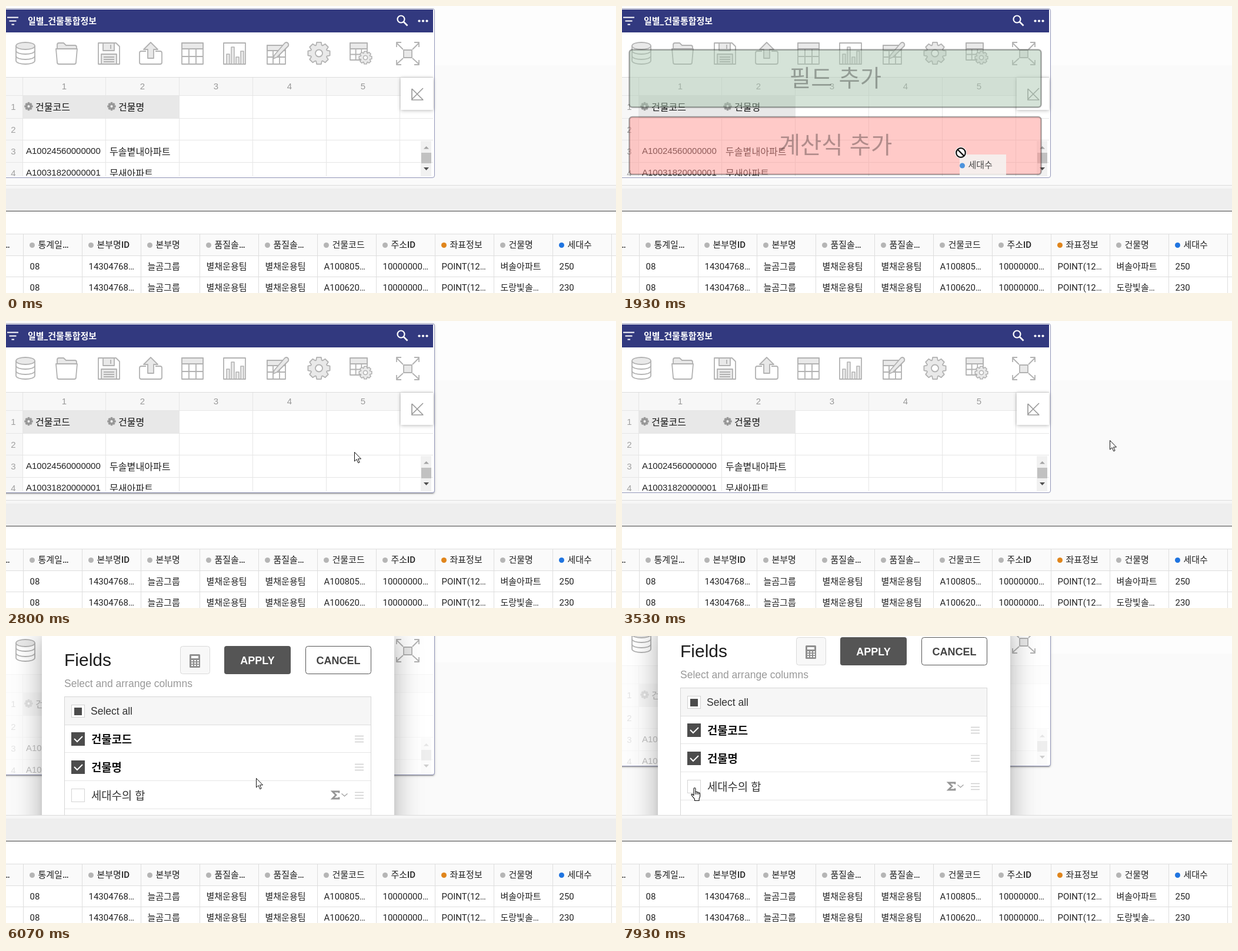
Write an HTML page that moves like this. It is 1037 px wide and 489 px high and loops after 8 s.

```html
<!DOCTYPE html>
<html lang="ko">
<head>
<meta charset="utf-8">
<style>
  html, body { margin: 0; width: 100%; height: 100%; overflow: hidden; background: #fff; }
  svg, div { position: absolute; left: 0; top: 0; }
  svg { overflow: visible; }
  text { white-space: pre; }
  #stage { width: 1037px; height: 489px; overflow: hidden; }
  #pane { width: 1037px; height: 305px; overflow: hidden; background: #fafafa; }
  #scroller { width: 1037px; height: 700px; }
  #sky { width: 1037px; height: 101px; background: #fdfdfd; }
  #win, #lift { left: -10px; top: 4px; width: 737px; height: 287px; border: 1px solid #9296b8; border-radius: 4px; background: #fff; }
  #lift { box-shadow: 0 3px 1px -2px rgba(0,0,0,.2), 0 2px 2px rgba(0,0,0,.14), 0 1px 5px rgba(0,0,0,.12); }
  #dialog { width: 1037px; height: 700px; }
  #sheet { left: 61px; top: 42px; width: 599px; height: 600px; background: #fff;
    box-shadow: 0 11px 15px -7px rgba(0,0,0,.2), 0 24px 38px 3px rgba(0,0,0,.14), 0 9px 46px 8px rgba(0,0,0,.12); }
  #card { filter: drop-shadow(0 1px 3px rgba(0,0,0,.28)); }
</style>
</head>
<body>
<div id="stage">
  <div id="pane"><div id="scroller">
    <div id="sky"></div><div id="lift"></div><div id="win"></div>
    <svg id="grid" width="1037" height="700"></svg>
    <div id="dialog"><div id="sheet"></div><svg id="fields" width="1037" height="700"></svg></div>
  </div></div>
  <svg id="table" width="1037" height="489"></svg>
  <svg id="overlay" width="1037" height="489"></svg>
</div>
<script>
const $ = id => document.getElementById(id);
const KR = "'Noto Sans CJK KR','Noto Sans CJK JP'";
const ARIAL = `'Liberation Sans',${KR},sans-serif`;
const ROBOTO = `Roboto,${KR},sans-serif`;

// Drawing helpers; text is placed by its vertical centre.
const rect = (x, y, w, h, fill, more = '') =>
  `<rect x="${x}" y="${y}" width="${w}" height="${h}" fill="${fill}" ${more}/>`;
const path = (d, stroke, width = 1, fill = 'none', more = '') =>
  `<path d="${d}" stroke="${stroke}" stroke-width="${width}" fill="${fill}" ${more}/>`;
const dot = (x, y, r, fill) => `<circle cx="${x}" cy="${y}" r="${r}" fill="${fill}"/>`;
const text = (x, cy, str, size, fill, { font = ARIAL, weight = 400, anchor = 'start' } = {}) =>
  `<text x="${x}" y="${cy + size * .36}" font-family="${font}" font-size="${size}" ` +
  `font-weight="${weight}" text-anchor="${anchor}" fill="${fill}">${str}</text>`;
const box = (x, y, w, h, fill, stroke, r = 0) =>
  rect(x + .5, y + .5, w - 1, h - 1, fill, `stroke="${stroke}" rx="${r}"`);

function gear(cx, cy, r, hole, stroke, fill, width) {
  const pts = [];
  for (let i = 0; i < 8; i++)
    for (const [turn, k] of [[-.34, .76], [-.2, 1], [.2, 1], [.34, .76]]) {
      const a = i * Math.PI / 4 + turn;
      pts.push(`${(cx + r * k * Math.cos(a)).toFixed(1)} ${(cy + r * k * Math.sin(a)).toFixed(1)}`);
    }
  return path(`M${pts.join('L')}Z`, stroke, width, fill, 'stroke-linejoin="round"') +
    `<circle cx="${cx}" cy="${cy}" r="${hole}" fill="#fff" stroke="${stroke}" stroke-width="${width}"/>`;
}

function toolbar() {
  const ink = '#b2b2b2', tint = '#e9e9e9';
  const line = (d, fill = 'none', w = 1.8) => path(d, ink, w, fill, 'stroke-linejoin="round"');
  const sheet = (x, s) => line(`M${x} 63h${s}v${s}h${-s}z`, '#fff') + line(`M${x} 63h${s}v10h${-s}z`, tint) +
    line(`M${x} ${73 + (s - 10) / 2}h${s}M${x + s / 3} 73v${s - 10}M${x + s * 2 / 3} 73v${s - 10}`);
  return [
    line('M17 68v25c0 8 32 8 32 0V68', '#fff') + line('M17 68c0-8 32-8 32 0s-32 8-32 0', tint) +
      line('M17 76c0 8 32 8 32 0M17 85c0 8 32 8 32 0'),
    line('M87 72v-6q0-3 3-3h8l4 4h15q3 0 3 3v3', tint) + line('M85 73h36l-2 23q0 3-3 3H90q-3 0-3-3z', '#fff'),
    line('M157 63h30l6 6v30h-36z', '#fff') + line('M165 63h19v13h-19z', tint) + line('M178 66v7') +
      line('M162 82h26v17h-26z', tint) + line('M166 87h18M166 91h18M166 95h18'),
    line('M238 77h-8q-3 0-3 3v16q0 3 3 3h32q3 0 3-3V80q0-3-3-3h-8', '#fff') +
      line('M241 89V74h-7l12-12 12 12h-7v15z', tint),
    sheet(299, 36),
    line('M370 63h37v36h-37z', '#fff') + line('M375 82h5v17h-5zM383 70h5v29h-5zM391 87h5v12h-5zM399 77h5v22h-5z', tint, 1.5),
    line('M444 67h31v32h-31z', '#fff') + line('M444 67h31v9h-31z', tint) +
      line('M444 87h31M454 76v23M465 76v23') + line('M456 84l18-21q3-2 5 0t1 5l-19 19-7 3z', tint),
    gear(532, 80.5, 19, 6, ink, tint, 1.8),
    sheet(585, 29) + gear(611, 88, 11, 3.5, ink, tint, 1.6),
    line('M676 75h14v13h-14z', tint) + line('M675 74l-11-11M691 74l11-11M675 89l-11 10M691 89l11 10' +
      'M664 70v-8h8M694 62h8v8M664 92v8h8M694 100h8v-8')
  ].join('');
}

function drawGrid() {
  const edges = [28, 169, 294, 419, 544, 669];
  const rows = [152, 191, 228, 266];
  const centre = { anchor: 'middle' };
  const headings = [[50, 38.5, '건물코드'], [191, 179.5, '건물명']];
  const cells = [[247, 'A10024560000000', '두솔볕내아파트'], [284, 'A10031820000001', '무새아파트']];
  $('grid').innerHTML =
    '<clipPath id="body"><rect y="45" width="726" height="245"/></clipPath>' +
    rect(0, 6, 726, 39, '#32397f') +
    path('M2 19.5h19M5.500 25.500h12M9.500 31.500h4.500', '#fff', 2) +
    text(37, 26, '일별_건물통합정보', 15, '#fff', { font: ROBOTO, weight: 700 }) +
    `<circle cx="671.5" cy="22.500" r="6" fill="none" stroke="#fff" stroke-width="2.200"/>` +
    path('M676 27l6.500 6.500', '#fff', 2.6) + [702.5, 709, 715.5].map(x => dot(x, 25.5, 2.1, '#fff')).join('') +
    toolbar() +
    '<g clip-path="url(#body)">' +
      rect(0, 121, 726, 1, '#dcdcdc') + rect(0, 122, 726, 30, '#f7f7f7') + rect(0, 122, 28, 170, '#f7f7f7') +
      rect(29, 153, 265, 38, '#e8e8e8') +
      edges.map(x => rect(x, 122, 1, 170, '#e6e6e6')).join('') +
      rows.map(y => rect(0, y, 726, 1, '#e6e6e6')).join('') +
      [99, 232, 357, 482, 607].map((x, i) => text(x, 137, i + 1, 15, '#999', centre)).join('') +
      [172, 211, 247.5, 284.5].map((y, i) => text(12.5, y, i + 1, 15, '#a0a0a0', centre)).join('') +
      headings.map(([x, g, s]) => gear(g, 171, 7, 2.2, '#979797', '#979797', .5) +
        text(x, 172.5, s, 16, '#111', { weight: 500 })).join('') +
      cells.map(([y, code, name]) => text(34, y, code, 15, '#222') + text(176, y + 1, name, 16.1, '#222')).join('') +
      rect(705, 230, 18, 60, '#f1f1f1') + rect(706, 250, 17, 18, '#c1c1c1') +
      path('M710 243.5h9l-4.500-4.500z', 'none', 0, '#a3a3a3') + path('M710 275h9l-4.500 5z', 'none', 0, '#505050') +
      '<rect id="veil" y="121" width="726" height="170" fill="#fff" opacity=".72"/>' +
    '</g>' +
    `<g id="card">${rect(671, 122, 55, 55, '#fff')}${path('M709 140l-19 19M690 141v19h19.500M690 141l19 19', '#9a9a9a', 1.7, 'none', 'stroke-dasharray="67 60"')}</g>`;
}

function drawFields() {
  const handle = y => path(`M593 ${y - 5}h15M593 ${y}h15M593 ${y + 5}h15`, '#cfcfcf', 1.3);
  const row = (y, label, on) =>
    (on ? rect(111, y - 12, 23, 23, '#4c4c4c') + path(`M116 ${y - 1}l5 5 9-9`, '#fff', 2)
        : box(111, y - 12, 23, 23, '#fff', '#d4d4d4')) +
    text(145, y, label, 18.8, on ? '#111' : '#333', { weight: on ? 700 : 400 }) +
    handle(y - .5) + rect(100, y + 22, 520, 1, '#e6e6e6');
  const keys = [0, 1, 2].flatMap(r => [0, 1, 2].map(c => rect(315 + c * 5, 97 + r * 4, 3, 2.2, '#fff'))).join('');
  $('fields').innerHTML =
    text(99, 96.5, 'Fields', 30, '#1c1c1c') +
    box(296, 73, 51, 48, '#f8f8f8', '#dadada', 4) + rect(312, 87, 18, 23, '#8f8f8f', 'rx="1.5"') +
    rect(315, 90, 12, 4, '#fff') + keys +
    rect(371, 73, 113, 48, '#555', 'rx="4"') +
    text(427.5, 97.5, 'APPLY', 18, '#fff', { weight: 700, anchor: 'middle' }) +
    box(509, 73, 112, 48, '#fff', '#555', 4) +
    text(565, 97.5, 'CANCEL', 18, '#444', { weight: 700, anchor: 'middle' }) +
    text(99, 137, 'Select and arrange columns', 17.5, '#999') +
    box(99, 159, 522, 430, '#fff', '#d6d6d6') + rect(100, 160, 520, 48, '#f6f6f6') + rect(100, 207, 520, 1, '#dedede') +
    box(111, 173, 23, 22, '#fff', '#d0d0d0') + rect(116, 178, 13, 13, '#4c4c4c') +
    text(144, 184, 'Select all', 17.5, '#333') +
    row(232, '건물코드', true) + row(280, '건물명', true) + row(328, '세대수의 합', false) +
    path('M566 323.500v-2.500h-11l6 6-6 6h11v-2.500', '#969696', 2.8) + path('M570.500 324.500l5 4.500 5-4.500', '#a0a0a0', 1.3);
}

function drawTable() {
  const heads = ['통계일…', '본부명ID', '본부명', '품질솔…', '품질솔…', '건물코드', '주소ID', '좌표정보', '건물명', '세대수'];
  const record = (code, name, count) =>
    ['08', '14304768…', '늘곰그룹', '별채운용팀', '별채운용팀', code, '10000000…', 'POINT(12…', name, count];
  const records = [record('A100805…', '벼솔아파트', '250'), record('A100620…', '도랑빛솔…', '230')];
  const tint = { 7: '#e0851c', 9: '#1f74e0' };
  let out = rect(0, 305, 1037, 184, '#fff') + rect(0, 305, 1037, 1, '#dcdcdc') + rect(0, 306, 1037, 5, '#f6f6f6') +
    rect(0, 311, 1037, 38, '#eee') + rect(0, 349, 1037, 1, '#444') + rect(0, 389, 1037, 36, '#fafafa') +
    [388, 425, 461].map(y => rect(0, y, 1037, 1, '#dedede')).join('') +
    text(-4, 406.5, '…', 15, '#222', { font: ROBOTO, weight: 500 });
  for (let i = 0; i <= 10; i++) out += rect(29 + i * 100, 388, 1, 101, '#dedede');
  heads.forEach((s, i) => {
    out += dot(44.5 + i * 100, 407.5, 4.5, tint[i] || '#b5b5b5') +
      text(54.5 + i * 100, 406.5, s, 15, '#222', { font: ROBOTO, weight: 500 });
  });
  records.forEach((cells, r) => cells.forEach((s, i) => {
    out += text(40.5 + i * 100, 443.5 + r * 36, s, 15, '#222', { font: ROBOTO });
  }));
  $('table').innerHTML = out;
}

function drawOverlay() {
  const zone = (y, fill, label) =>
    rect(12.5, y, 700, 98, fill, 'fill-opacity=".5" stroke="#000" stroke-opacity=".32" stroke-width="2.5" rx="5"') +
    `<g opacity=".3">${text(363, y + 48, label, 39.5, '#000', { anchor: 'middle' })}</g>`;
  $('overlay').innerHTML =
    `<g id="zones">${zone(74.5, '#abc7b1', '필드 추가')}${zone(189, '#ff9591', '계산식 추가')}</g>` +
    `<g id="ghost">${rect(-2, 3, 79, 36, '#f5f5f3', 'fill-opacity=".85"')}${dot(2.5, 22, 4.5, '#4d93dc')}` +
      text(12.5, 20.5, '세대수', 15, '#484848', { font: ROBOTO, weight: 500 }) + '</g>' +
    `<g id="arrow">${path('M.5.5v15.500l3.600-3.300 2.700 6.100 2.300-1-2.600-5.900h5z', '#111', 1, '#fff')}</g>` +
    `<g id="hand">${path('M5 14V2.200C5 .2 8 .2 8 2.200V8c.3-1.200 2.600-1 2.800.6.500-1 2.500-.7 2.600.8.600-.6 2.200-.3 2.200 1.500V15c0 2-1.500 3-1.500 5v2.500H6.500V20C5.500 18 2 15 1 12.800.3 11 2.700 10.300 5 14M8 8v4M10.800 8.600V12M13.400 9.500V12', '#111', 1.1, '#fff', 'stroke-linejoin="round"')}</g>` +
    '<g id="nodrop"><circle r="8" fill="#fff" stroke="#fff" stroke-width="4"/>' +
      '<circle r="7.800" fill="#fff" stroke="#111" stroke-width="2.200"/>' + path('M-5.500-5.500l11 11', '#111', 2.4) + '</g>';
}

// Times are ticks of 1/15 s; a loop has 120 of them.
const TICKS = 120;
const pointer = [
  [4, 1017, 382], [7, 983, 397], [10, 983, 397], [11, 983, 398], [12, 983, 398], [13, 982, 399], [24, 982, 399],
  [25, 880, 362], [29, 576, 250], [32, 506, 231], [36, 506, 231], [37, 505, 228], [38, 505, 228],
  [49, 743, 214], [53, 829, 203], [55, 869, 199], [57, 850, 185], [61, 660, 105], [62, 660, 105], [66, 592, 84],
  [79, 592, 84], [80, 575, 83], [86, 430, 328], [87, 430, 328], [92, 424, 220], [100, 422, 191], [105, 400, 205],
  [113, 138, 267], [119, 117, 258]
];
const shapes = [[0, ''], [4, 'arrow'], [25, 'nodrop'], [37, 'arrow'], [61, 'hand'], [82, 'arrow'], [111, 'hand']];
const scroll = [[88, 0], [99, 306], [101, 306], [109, 71]];
const lift = [[39, 0], [42, 1], [47, 1], [50, 0], [60, 0], [66, 1], [84, 1], [86, 0], [88, 0], [91, 1]];

const smooth = p => p * p * (3 - 2 * p);
function sample(track, tick, ease = p => p) {
  const next = track.findIndex(k => k[0] > tick);
  if (next === 0) return track[0].slice(1);
  if (next < 0) return track[track.length - 1].slice(1);
  const a = track[next - 1], b = track[next];
  const p = ease((tick - a[0]) / (b[0] - a[0]));
  return a.slice(1).map((v, i) => v + (b[i + 1] - v) * p);
}
const show = (id, on) => { $(id).style.display = on ? '' : 'none'; };

function render(now) {
  const tick = Math.floor((now - start) * .015 + .1) % TICKS;
  const [x, y] = sample(pointer, tick).map(Math.round);
  const shape = shapes.filter(s => s[0] <= tick).pop()[1];
  for (const id of ['arrow', 'hand', 'nodrop', 'ghost']) {
    show(id, id === shape || (id === 'ghost' && shape === 'nodrop'));
    $(id).setAttribute('transform', `translate(${x} ${y})`);
  }
  show('zones', shape === 'nodrop');
  const open = tick >= 73;
  show('dialog', open);
  show('veil', open);
  show('card', !open);
  $('scroller').style.top = -Math.round(sample(scroll, tick, smooth)[0]) + 'px';
  $('lift').style.opacity = sample(lift, tick)[0];
}

drawGrid();
drawFields();
drawTable();
drawOverlay();
const start = performance.now();
render(start);
requestAnimationFrame(function loop() {
  render(performance.now());
  requestAnimationFrame(loop);
});
</script>
</body>
</html>
```
